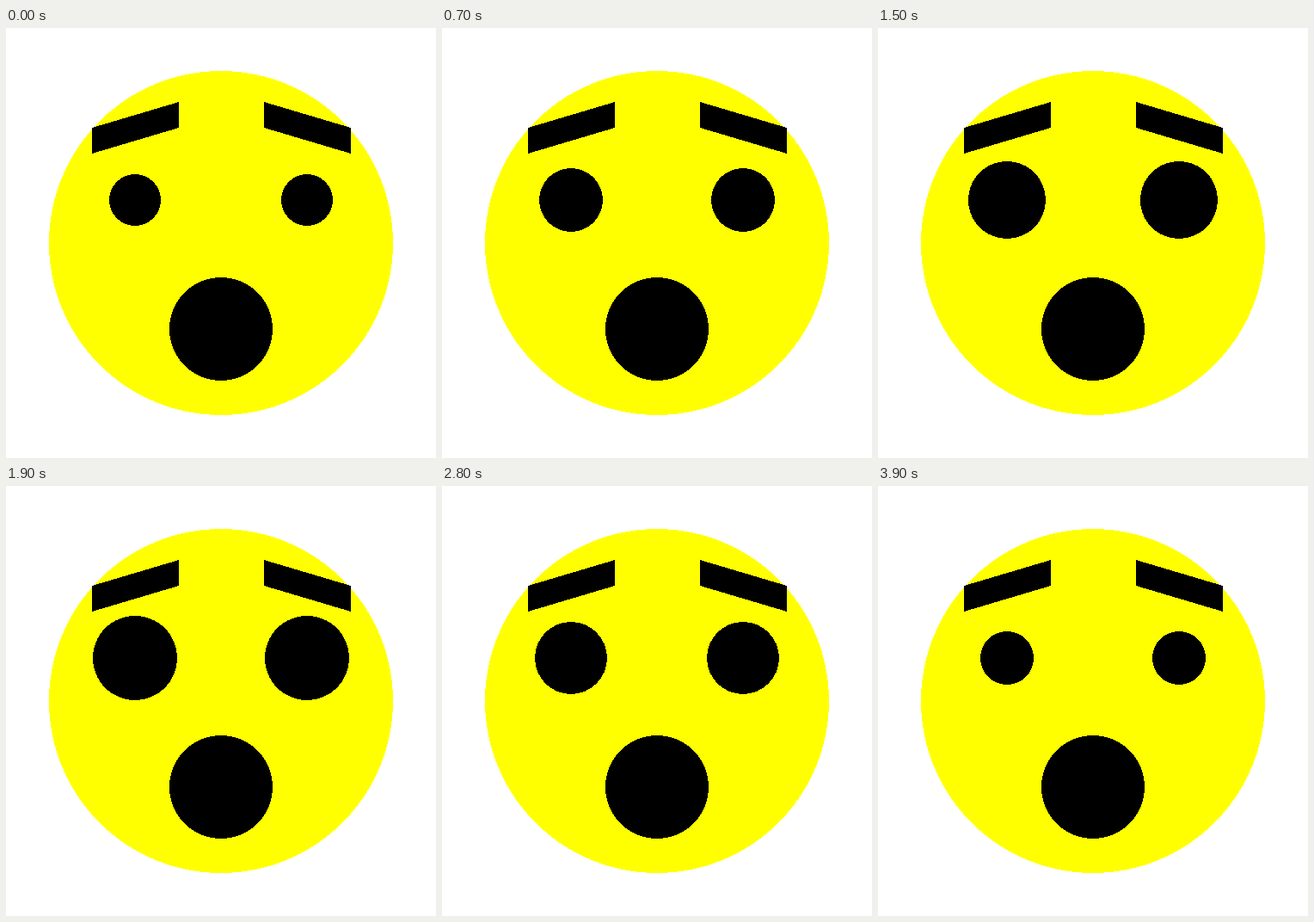
An HTML page for the animation above (4 s loop, 500 by 500 pixels).

```html
<!DOCTYPE html>
<html lang="en">
<head>
<meta charset="utf-8">
<title>Surprised face</title>
<style>
  html, body { margin: 0; width: 100%; height: 100%; overflow: hidden; background: #fff; }
  svg { display: block; width: 500px; height: 500px; }
</style>
</head>
<body>
<svg viewBox="0 0 500 500" shape-rendering="crispEdges">
  <circle cx="250" cy="250" r="200" fill="#ff0"/>
  <path d="M100 116L201 86V116L100 146ZM300 86L401 116V146L300 116Z"/>
  <circle class="eye" cx="150" cy="200" r="30"/>
  <circle class="eye" cx="350" cy="200" r="30"/>
  <circle cx="250" cy="350" r="60"/>
</svg>
<script>
  const STEP = 100, STEPS = 40, MIN_RADIUS = 30;
  const eyes = document.querySelectorAll('.eye');
  const start = performance.now();

  // The eyes widen by one pixel per step, then shrink back at the same rate.
  function draw() {
    const step = Math.floor((performance.now() - start) / STEP) % STEPS;
    const radius = MIN_RADIUS + Math.min(step, STEPS - step);
    eyes.forEach(eye => eye.setAttribute('r', radius));
    requestAnimationFrame(draw);
  }
  draw();
</script>
</body>
</html>
```
